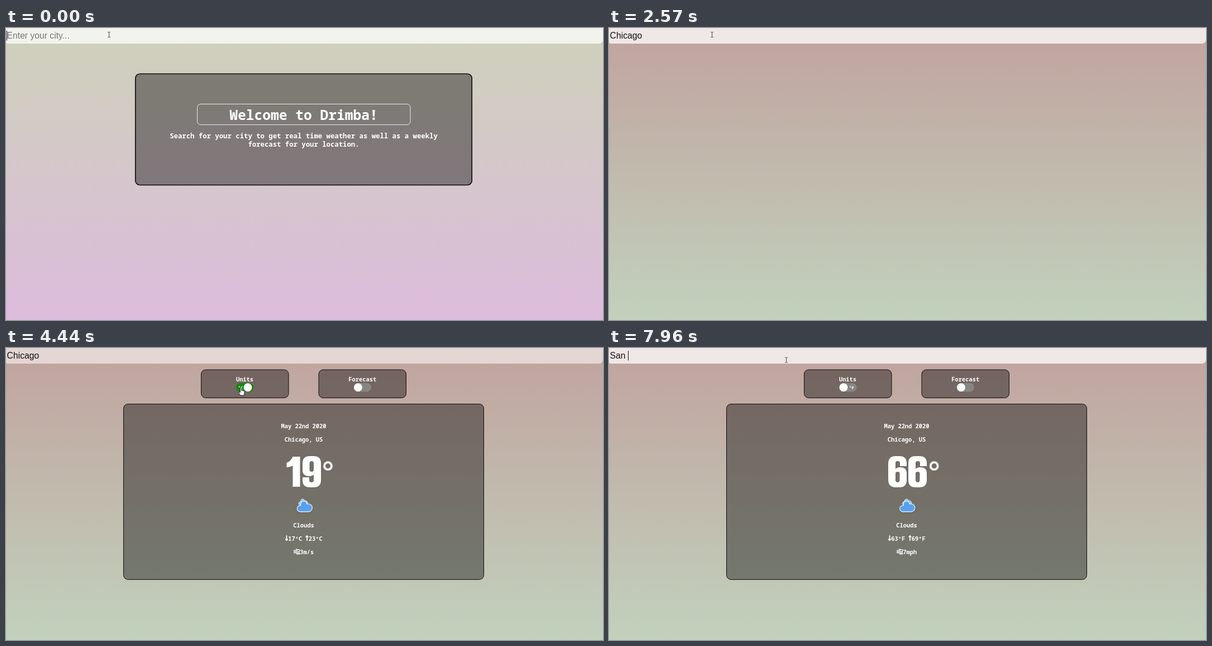
Recreate the animation shown at these times as an HTML page. Size 1069x524 px, loop 7.99 s.

```html
<!DOCTYPE html>
<html lang="en">
<head>
<meta charset="utf-8">
<title>Weather search</title>
<style>
  html, body { margin: 0; width: 100%; height: 100%; overflow: hidden; }
  svg { display: block; width: 1069px; height: 524px; }
  text { white-space: pre; }
  .mono { font-family: "Noto Sans Mono", "DejaVu Sans Mono", monospace; font-weight: 600; fill: #fff; }
  .mid { text-anchor: middle; }
  .h1 { font-size: 24.6px; font-weight: 700; }
  .sub { font-size: 12.3px; font-weight: 700; }
  .info { font-size: 10.4px; }
  .tiny { font-size: 7.7px; }
  .field { font: 15.7px "Liberation Sans", Arial, sans-serif; }
  .card { fill: rgba(0, 0, 0, .4); stroke: #0c0a0a; }
  .line { fill: none; stroke: #fff; stroke-linecap: round; stroke-linejoin: round; }
  .clouds path { stroke: #fff; stroke-width: 1.2; }
</style>
</head>
<body>
<svg viewBox="0 0 1069 524">
  <defs>
    <linearGradient id="dawn" x2="0" y2="1">
      <stop stop-color="#ced1ba"/><stop offset="1" stop-color="#dcbcdc"/>
    </linearGradient>
    <linearGradient id="dusk" x2="0" y2="1">
      <stop stop-color="#c1a39e"/><stop offset="1" stop-color="#c1d1bc"/>
    </linearGradient>
    <path id="cloud" d="M47.7 35.4c0-4.6-3.7-8.2-8.2-8.2c-1 0-1.9.2-2.8.5c-.3-3.4-3.1-6.2-6.6-6.2c-3.7 0-6.7 3-6.7 6.7c0 .8.2 1.6.4 2.3c-.3-.1-.7-.1-1-.1c-3.7 0-6.7 3-6.7 6.7c0 3.6 2.9 6.6 6.5 6.7h17.2c4.4-.5 7.9-4 7.9-8.4z"/>
    <path id="six" fill-rule="evenodd" d="M13 0H20Q33 0 33 13V18H21V12Q21 9 17 9Q13 9 13 12V23Q16 20 21 20Q33 20 33 31V43Q33 56 20 56H13Q0 56 0 43V13Q0 0 13 0ZM13 31V43Q13 47 16.7 47Q20.5 47 20.5 43V31Q20.5 28 16.7 28Q13 28 13 31Z"/>
    <path id="one" d="M11 1H24V55H11V17Q7 19.500 0 20V12Q8 9 11 1Z"/>
    <path id="down" class="line" stroke-width="1.7" d="M2.500 .5V8.500M.7 6.800L2.500 9L4.300 6.800"/>
  </defs>

  <rect id="sky" width="1069" height="524"/>

  <g id="welcome">
    <rect class="card" x="231.750" y="82.250" width="602.500" height="199.500" rx="8" stroke-width="1.600"/>
    <rect class="line" x="342.500" y="136.500" width="381.500" height="37" rx="6" stroke-width="1" stroke-opacity=".85"/>
    <text class="mono mid h1" x="533" y="164.500">Welcome to Drimba!</text>
    <text class="mono mid sub" x="533" y="197.500">Search for your city to get real time weather as well as a weekly</text>
    <text class="mono mid sub" x="533" y="213">forecast for your location.</text>
  </g>

  <g id="weather">
    <rect class="card" x="349.500" y="39" width="156.500" height="50.500" rx="8"/>
    <rect class="card" x="560" y="39" width="156.500" height="50.500" rx="8"/>
    <rect class="card" x="210.500" y="100.500" width="645" height="315" rx="8"/>

    <text class="mono mid info" x="427.500" y="60">Units</text>
    <rect id="track" x="412" y="63" width="31.500" height="15.500" rx="7.750"/>
    <text id="label" class="mono tiny" y="73.500"></text>
    <circle id="knob" cy="70.700" r="7.400" fill="#fff"/>
    <text class="mono mid info" x="638.200" y="60">Forecast</text>
    <rect x="622.500" y="63" width="31.500" height="15.500" rx="7.750" fill="#868683"/>
    <circle cx="630.500" cy="70.700" r="7.400" fill="#fff"/>

    <text class="mono mid info" x="533" y="143.500">May 22nd 2020</text>
    <text class="mono mid info" x="533" y="167.500">Chicago, US</text>

    <g id="tempF" fill="#fff" role="img" aria-label="66°">
      <use href="#six" x="500" y="194"/><use href="#six" x="536" y="194"/>
      <circle class="line" cx="582.200" cy="211.700" r="6.500" stroke-width="3.800"/>
    </g>
    <g id="tempC" fill="#fff" role="img" aria-label="19°">
      <use href="#one" x="502.500" y="194"/>
      <use href="#six" transform="translate(564 250) rotate(180)"/>
      <circle class="line" cx="576.500" cy="211.700" r="6.500" stroke-width="3.800"/>
    </g>

    <g class="clouds" transform="translate(522.950 265.800) scale(.856)" style="filter:drop-shadow(0 3px 2px rgba(0,0,0,.06))">
      <g id="small"><g transform="translate(-10 -6.700) scale(.6)" fill="#91c0f8"><use href="#cloud" stroke="#fff" stroke-width="1.500"/></g></g>
      <g id="big"><g transform="translate(-20 -11)" fill="#57a0ee"><use href="#cloud" stroke="#fff" stroke-width="1.200"/></g></g>
    </g>

    <text class="mono mid info" x="533" y="321.500">Clouds</text>
    <use href="#down" x="500" y="336.300"/>
    <text id="low" class="mono info" x="505.300" y="345.500"></text>
    <use href="#down" transform="translate(541.500 345.800) rotate(180)"/>
    <text id="high" class="mono info" x="541.700" y="345.500"></text>
    <path class="line" stroke-width="1.350" transform="translate(515.500 360.500)"
      d="M0 2.800H4.800A1.200 1.200 0 1 0 3.800 .8M0 4.900H8.800A1.900 1.900 0 1 0 7.200 1.600M0 7H6A1.200 1.200 0 1 1 4.900 9M8.300 6.900A1.300 1.300 0 1 1 7.900 9"/>
    <text id="wind" class="mono info" x="526.300" y="369.500"></text>
  </g>

  <path id="bar" d="M0 0H1069V20Q1069 28 1061 28H4Q0 28 0 25Z" fill="#fff"/>
  <rect id="mark" x="1.500" y="5" width="58" height="17.500" fill="#3390ff"/>
  <text id="field" class="field" x="1.600" y="19"></text>
  <rect id="caret" y="5" width="1" height="17.500" fill="#111"/>

  <g id="status">
    <path d="M0 513H351Q353 513 353 515V524H0Z" fill="#eef1ec"/>
    <text x="-1" y="521" font-family="Liberation Sans, Arial, sans-serif" font-size="7" fill="#777">Connecting...</text>
  </g>

  <g id="beam"><path d="M-2.500 -4.500H-.7L0 -4L.7 -4.500H2.500M0 -4V4M-2.500 4.500H-.7L0 4L.7 4.500H2.500" fill="none" stroke="#333" stroke-width=".9"/></g>
  <path id="arrow" d="M0 0V11L2.600 8.700L4.200 12.300L5.800 11.600L4.200 8.100H7.700Z" fill="#fff" stroke="#111" stroke-width=".7"/>
  <path id="hand" d="M-1.100 .8Q0 -.6 1.100 .8V4.800Q2.300 4 3.100 5Q4.300 4.500 4.900 5.600Q6.500 5.200 6.500 7V9.500L5.300 13.500H-.7L-3.700 8.700Q-3.900 6.900 -1.100 8.300Z" fill="#fff" stroke="#111" stroke-width=".8"/>
</svg>

<script>
const LOOP = 7990, BLINK = 530;
const SEARCH = 2390, LOADED = 2900, TO_C = 4000, TO_F = 5450, FOCUS = 6250, SELECT = 6400;
const el = Object.fromEntries([...document.querySelectorAll('[id]')].map(e => [e.id, e]));
const pen = document.createElement('canvas').getContext('2d');
pen.font = '15.7px "Liberation Sans", Arial, sans-serif';

// [time, text]; each entry also restarts the caret
const typing = [
  [-130, ''], [960, ''], [1010, 'C'], [1370, 'Ch'], [1570, 'Chi'], [1660, 'Chic'],
  [1750, 'Chica'], [1840, 'Chicag'], [1930, 'Chicago'], [FOCUS, 'Chicago'],
  [7050, 'S'], [7230, 'Sa'], [7400, 'San'], [7560, 'San ']
];
// [time, x, y]
const mouse = [
  [0, 184.5, 12], [3600, 184.5, 12], [3930, 420.5, 71.5],
  [5550, 420.5, 71.5], [6130, 317.5, 21.5], [LOOP, 317.5, 21.5]
];

const clamp = v => Math.min(1, Math.max(0, v));
const ease = v => v * v * (3 - 2 * v);
const show = (e, on) => { e.style.display = on ? '' : 'none'; };
const set = (e, attrs) => { for (const k in attrs) e.setAttribute(k, attrs[k]); };
const swing = (t, period) => 1 - Math.abs((t / period % 1) * 2 - 1);

function drawField(t) {
  const [since, text] = typing.filter(k => k[0] <= t).pop();
  const focused = t < TO_C || t >= FOCUS;
  const selected = t >= SELECT && text === 'Chicago';
  el.field.textContent = text || 'Enter your city...';
  set(el.field, { fill: selected ? '#fff' : text ? '#111' : '#757575' });
  set(el.bar, { 'fill-opacity': focused ? .75 : .55 });
  set(el.caret, { x: Math.floor(1.9 + pen.measureText(text).width) });
  show(el.mark, selected);
  show(el.caret, focused && !selected && Math.floor((t - since) / BLINK) % 2 === 0);
}

function drawWeather(t) {
  show(el.weather, t >= LOADED);
  const celsius = t >= TO_C && t < TO_F;
  const slide = ease(clamp((t - TO_C) / 350)) - ease(clamp((t - TO_F) / 350));
  const mix = (a, b) => Math.round(a + (b - a) * slide);
  set(el.knob, { cx: 420 + 13 * slide });
  set(el.track, { fill: `rgb(${mix(134, 20)},${mix(134, 132)},${mix(131, 20)})` });
  set(el.label, { x: celsius ? 415.5 : 430 });
  el.label.textContent = celsius ? '°C' : '°F';
  el.low.textContent = celsius ? '17°C' : '63°F';
  el.high.textContent = celsius ? '23°C' : '69°F';
  el.wind.textContent = celsius ? '3m/s' : '7mph';
  show(el.tempC, celsius);
  show(el.tempF, !celsius);
  const age = Math.max(0, t - LOADED);
  set(el.small, { transform: `translate(${-5 + 15 * swing(age, 7000)} 0)` });
  set(el.big, { transform: `translate(${2 * swing(age, 3000)} 0)` });
}

function drawMouse(t) {
  const i = mouse.findIndex(k => k[0] > t);
  const [t0, x0, y0] = mouse[i - 1], [t1, x1, y1] = mouse[i];
  const p = ease((t - t0) / (t1 - t0));
  const x = x0 + (x1 - x0) * p, y = y0 + (y1 - y0) * p;
  const onToggle = x > 412 && x < 444 && y > 63 && y < 79;
  const kind = y < 28 ? 'beam' : onToggle ? 'hand' : 'arrow';
  for (const name of ['beam', 'hand', 'arrow']) {
    show(el[name], name === kind);
    set(el[name], { transform: `translate(${x} ${y})` });
  }
}

function draw(t) {
  set(el.sky, { fill: t < SEARCH ? 'url(#dawn)' : 'url(#dusk)' });
  show(el.welcome, t < SEARCH);
  show(el.status, t >= LOADED && t < 3600);
  drawField(t);
  drawWeather(t);
  drawMouse(t);
}

const start = performance.now();
function tick() {
  draw((performance.now() - start) % LOOP);
  requestAnimationFrame(tick);
}
tick();
</script>
</body>
</html>
```
